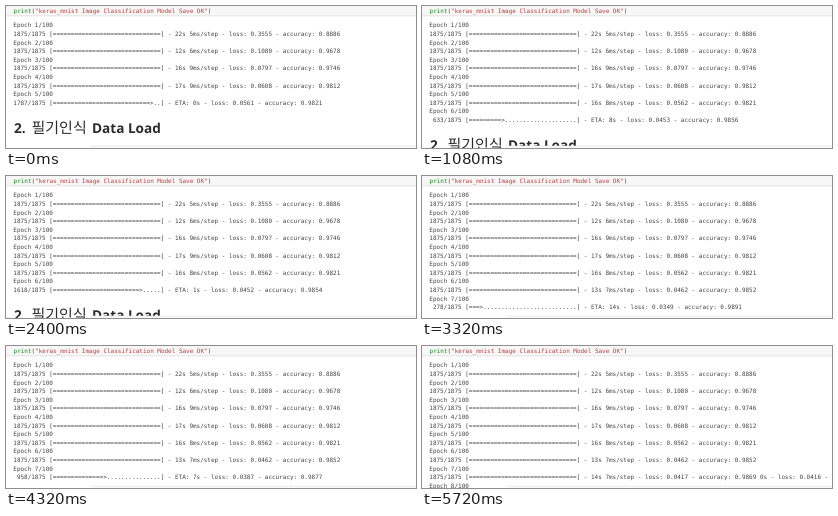
An HTML page that plays this animation: 410x142 px, repeating every 5760 ms.

```html
<!DOCTYPE html>
<html lang="ko">
<head>
<meta charset="utf-8">
<style>
  html, body { margin: 0; width: 100%; height: 100%; overflow: hidden; background: #fff; }
  svg { display: block; }
  text { white-space: pre; text-rendering: geometricPrecision; }
  .mono { font: 5.975px "DejaVu Sans Mono", monospace; fill: #444; }
  .latin { font: 600 13.6px "Noto Sans", sans-serif; }
  .hangul { font: 300 15px "Noto Sans CJK KR", "Noto Sans CJK", sans-serif; }
</style>
</head>
<body>
<svg width="410" height="142" viewBox="0 0 410 142">
  <rect width="410" height="10" fill="#f7f7f7"/>
  <rect y="9.5" width="410" height=".8" fill="#dedede"/>
  <text class="mono" x="7.6" y="6.6"><tspan fill="#1a8a1a">print</tspan>(<tspan fill="#c23a3a">"keras_mnist Image Classification Model Save OK"</tspan>)</text>
  <g id="log"></g>
  <text id="title" fill="#2b2b2b"><tspan class="latin" x="8">2.</tspan><tspan class="hangul" x="25.5">필기인식</tspan><tspan class="latin" x="86">Data Load</tspan></text>
  <rect x="84" y="140" width="326" height="2" fill="#fafafa"/>
  <rect x="84" y="139.7" width="326" height=".7" fill="#e6e6e6"/>
</svg>
<script>
const LOOP = 5760, TICK = 40, STEPS = 1875, PITCH = 8.6, FIRST = 5;

// The last line keeps the tail of the longer line it overwrote
const results = [
  "22s 5ms/step - loss: 0.3555 - accuracy: 0.8886",
  "12s 6ms/step - loss: 0.1080 - accuracy: 0.9678",
  "16s 9ms/step - loss: 0.0797 - accuracy: 0.9746",
  "17s 9ms/step - loss: 0.0608 - accuracy: 0.9812",
  "16s 8ms/step - loss: 0.0562 - accuracy: 0.9821",
  "13s 7ms/step - loss: 0.0462 - accuracy: 0.9852",
  "14s 7ms/step - loss: 0.0417 - accuracy: 0.9869 0s - loss: 0.0416 - accuracy: 0.9870"
];

// Time and training steps counted from the start of epoch 5
const pace = [[0, 1787], [140, 1875], [560, 2147], [1760, 2979], [2400, 3493],
              [2800, 3750], [3320, 4028], [4320, 4708], [5640, 5625]];

// Distance from the final value at progress p is (1 - p)(c + d p)
const drift = {
  5: { eta: [16, 0], loss: [-21, 0], acc: [0, 0] },
  6: { eta: [12.2, 0], loss: [27, -120], acc: [0, 16] },
  7: { eta: [17, -2.8], loss: [-87.6, 51.4], acc: [29.6, -26] }
};

const log = document.getElementById("log");
const title = document.getElementById("title");
const rows = Array.from({ length: 15 }, (_, i) => {
  const row = document.createElementNS("http://www.w3.org/2000/svg", "text");
  row.setAttribute("class", "mono");
  row.setAttribute("x", 7.3);
  row.setAttribute("y", 21.3 + PITCH * i);
  return log.appendChild(row);
});

function stepsAt(t) {
  const i = pace.findIndex(([time]) => time > t);
  if (i < 0) return pace[pace.length - 1][1];
  const [[t0, s0], [t1, s1]] = [pace[i - 1], pace[i]];
  return Math.round(s0 + (s1 - s0) * (t - t0) / (t1 - t0));
}

function bar(step) {
  const n = Math.floor(30 * step / STEPS);
  const head = step === STEPS ? "=".repeat(n) : n ? "=".repeat(n - 1) + ">" : "";
  return `${String(step).padStart(4)}/${STEPS} [${head.padEnd(30, ".")}] - `;
}

function running(epoch, step) {
  const p = step / STEPS;
  const [loss, acc] = results[epoch - 1].match(/0\.\d+/g).map(Number);
  const off = key => (1 - p) * (drift[epoch][key][0] + drift[epoch][key][1] * p);
  const score = (end, key) => (end + off(key) / 1e4).toFixed(4);
  return `${bar(step)}ETA: ${Math.floor(off("eta"))}s - loss: ${score(loss, "loss")} - accuracy: ${score(acc, "acc")}`;
}

function draw(t) {
  const total = stepsAt(t);
  const epoch = FIRST + Math.floor(total / STEPS);
  const lines = [];
  for (let e = 1; e < epoch; e++) lines.push(`Epoch ${e}/100`, bar(STEPS) + results[e - 1]);
  lines.push(`Epoch ${epoch}/100`);
  if (drift[epoch]) lines.push(running(epoch, total % STEPS));
  rows.forEach((row, i) => row.textContent = lines[i] || "");
  title.setAttribute("y", 126.7 + 2 * PITCH * (epoch - FIRST));
}

const start = performance.now();
function frame() {
  const t = (performance.now() - start) % LOOP;
  draw(Math.floor(t / TICK) * TICK);
  requestAnimationFrame(frame);
}
frame();
</script>
</body>
</html>
```
